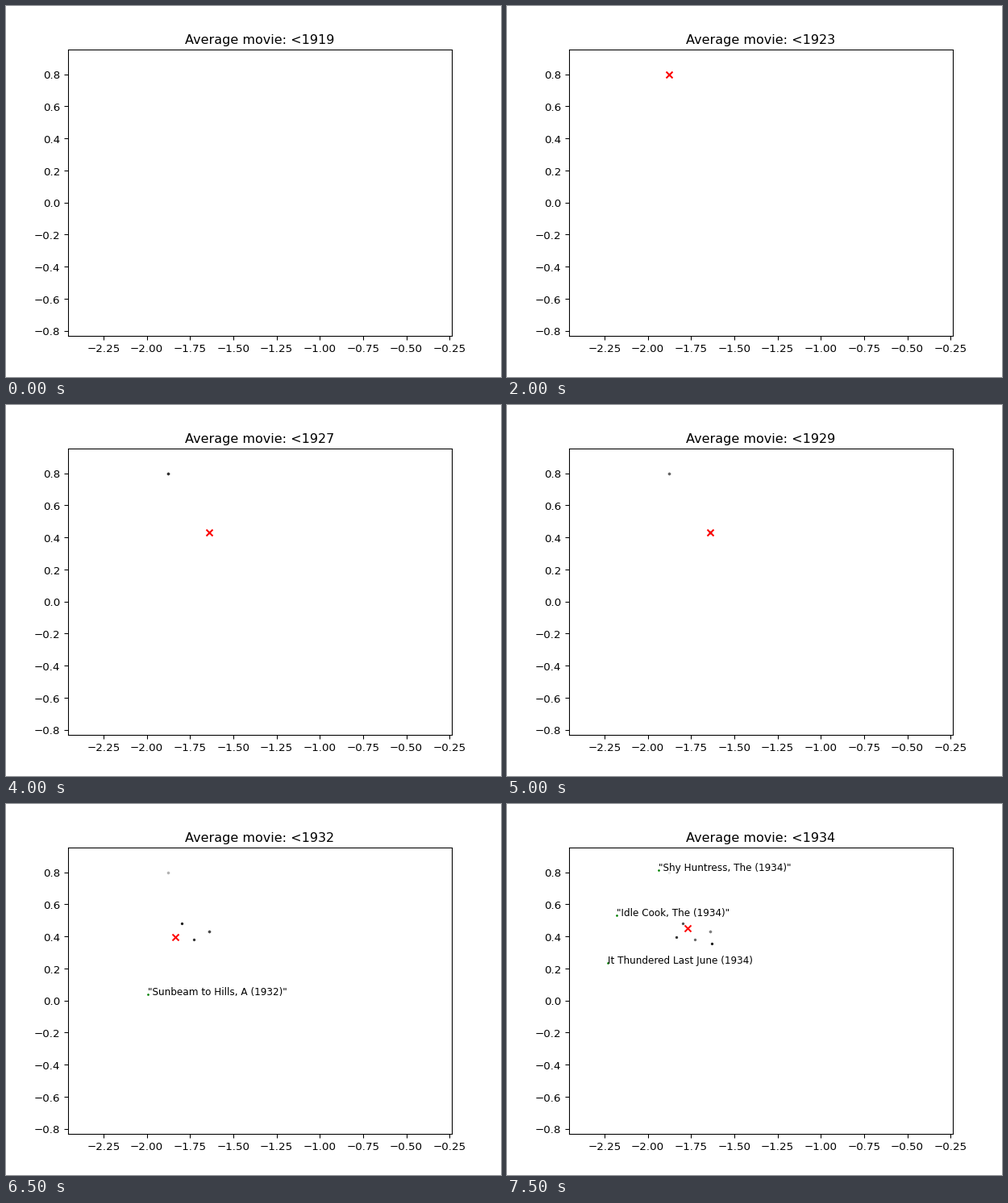
Recreate the animation shown at these times as a matplotlib script. Size 614 px wide and 460 px high, loop 8 s.

```python
import numpy as np
import matplotlib.pyplot as plt
from matplotlib.animation import FuncAnimation
from matplotlib.transforms import Affine2D

W, H, DPI = 614, 460, 96
FIRST, LAST = 1919, 1934
FADE = 10  # years until a past average turns white

plt.rcParams["font.family"] = "DejaVu Sans"

# Years in which the average moves; it holds its place in between.
MEANS = {
    1922: (-1.877, 0.797),
    1926: (-1.639, 0.431),
    1930: (-1.728, 0.380),
    1931: (-1.798, 0.481),
    1932: (-1.835, 0.395),
    1933: (-1.630, 0.355),
    1934: (-1.770, 0.451),
}

MOVIES = {
    1922: [(-1.877, 0.797,
            "Mondwinter (Mondwinter, eine Ballade der Wanderer) (1922)")],
    1926: [(-1.271, 0.064, '"Tinsmith, The (1926)"')],
    1930: [(-1.896, 0.290, '"Pale Falcon, The (Fahle Falke, Der) (1930)"')],
    1931: [(-2.009, 0.520, "Paper Lamps (1931)")],
    1932: [(-1.994, 0.038, '"Sunbeam to Hills, A (1932)"')],
    1933: [(-2.000, 0.215,
            "Noise in the Attic (Bruit au grenier: "
            "Jeunes voisins de la cour) (1933)")],
    1934: [(-1.938, 0.813, '"Shy Huntress, The (1934)"'),
           (-2.180, 0.531, '"Idle Cook, The (1934)"'),
           (-2.231, 0.234, "It Thundered Last June (1934)")],
}

fig = plt.figure(figsize=(W / DPI, H / DPI), dpi=DPI, facecolor="white")
ax = fig.add_axes([76.8 / W, 50.688 / H, 476.16 / W, 354.816 / H])
ax.set_xlim(-2.456, -0.237)
ax.set_ylim(-0.834, 0.9515)
ax.set_xticks(np.arange(-9, 0) / 4)
ax.set_yticks(np.arange(-4, 5) / 5)
title = ax.set_title("")

# All text sits a fraction of a pixel below its anchor.
drop = Affine2D().translate(0, -0.8)
for label in [title, *ax.get_xticklabels(), *ax.get_yticklabels()]:
    label.set_transform(label.get_transform() + drop)

drawn = []


def mean_at(year):
    past = [y for y in MEANS if y <= year]
    return MEANS[max(past)] if past else None


def mark(x, y, color, size=1, width=1.5, marker="o"):
    drawn.append(ax.scatter(x, y, s=size, color=color, marker=marker,
                            linewidths=width))


def update(step):
    while drawn:
        drawn.pop().remove()
    year = FIRST + step
    title.set_text(f"Average movie: <{year}")

    for age in range(FADE - 1, 0, -1):
        past = mean_at(year - age)
        if past:
            mark(*past, str(age / FADE))

    for x, y, name in MOVIES.get(year, []):
        mark(x, y, "green", width=1)
        drawn.append(ax.text(x, y, name, fontsize=9,
                             transform=ax.transData + drop))

    mean = mean_at(year)
    if mean:
        mark(*mean, "red", size=36, marker="x")
    return [title, *drawn]


anim = FuncAnimation(fig, update, frames=LAST - FIRST + 1, interval=500,
                     init_func=lambda: update(0), repeat=True, blit=False)
plt.show()
```
